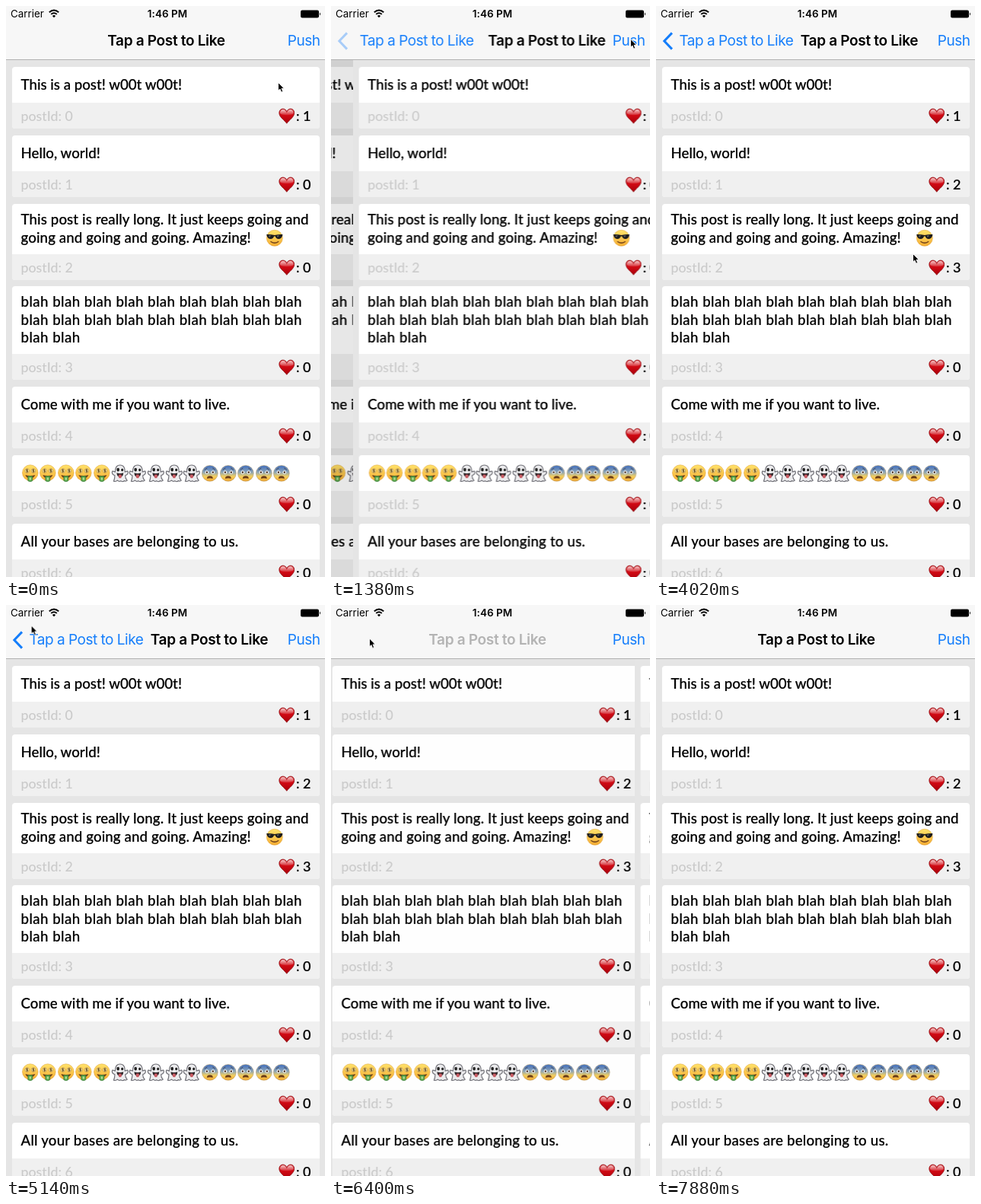
Recreate the animation shown at these times as an HTML page. Size 419x750 px, loop 8 s.

```html
<!DOCTYPE html>
<html lang="en">
<head>
<meta charset="utf-8">
<title>Tap a Post to Like</title>
<style>
:root {
  --spring: linear(0, .014 2%, .073 5%, .222 10%, .528 20%, .742 30%, .868 40%,
    .935 50%, .969 60%, .985 70%, .993 80%, .997 90%, 1);
  --blue: #157efb;
}
html, body { margin: 0; width: 100%; height: 100%; overflow: hidden; }
body { position: relative; background: #e5e5e5; color: #000; }
svg { display: block; overflow: visible; }

.page {
  position: absolute; inset: 0; overflow: hidden; background: #e5e5e5;
  font: 500 18.7px/23.4px Lato, "Open Sans", sans-serif;
}
.under { animation: under 8s var(--spring) infinite; }
.over { animation: over 8s var(--spring) infinite; }
.dim { position: absolute; inset: 0; background: #000; animation: dim 8s var(--spring) infinite; }

.card {
  position: absolute; left: 8px; width: 404px;
  border-radius: 4px; overflow: hidden; background: #fff;
}
.text {
  display: flex; flex-direction: column; justify-content: center;
  padding-left: 11.5px; white-space: pre; -webkit-text-stroke: .2px #000;
}
.emojis { display: flex; }
.emojis svg, .cool { width: 23.65px; height: 23.65px; }
.cool { position: absolute; left: 333px; top: 33px; }
.meta { position: relative; height: 34px; line-height: 34px; background: #f0f0f0; }
.id { position: absolute; left: 11.5px; font-size: 17.8px; color: #cacaca; }
.heart { position: absolute; left: 349.5px; top: 7px; width: 21.5px; height: 21px; }
.likes {
  position: absolute; right: 11.5px; font-size: 18px; white-space: pre;
  -webkit-text-stroke: .2px #000;
}
.likes::after { content: "0"; }
.n0::after { content: "1"; }
.n1::after { animation: likes1 8s step-end infinite; }
.n2::after { animation: likes2 8s step-end infinite; }

.nav {
  position: absolute; left: 0; top: 0; width: 100%; height: 70px; overflow: hidden;
  background: #f7f7f7; border-bottom: 1px solid #b2b2b2;
  font: 19px/24px Inter, Roboto, sans-serif; letter-spacing: -.5px; white-space: nowrap;
}
.nav > * { position: absolute; }
.title { top: 34px; width: 200px; text-align: center; font-weight: 600; letter-spacing: -.32px; }
.t1 { left: 110.5px; animation: t1 8s var(--spring) infinite, t1fade 8s linear infinite; }
.t2 { left: 167px; animation: t2 8s var(--spring) infinite, fade 8s linear infinite; }
.back { left: 30.5px; top: 34px; color: var(--blue);
  animation: back 8s var(--spring) infinite, fade 8s linear infinite; }
.chevron { left: 9px; top: 34px; animation: chevron 8s linear infinite; }
.push { right: 6.5px; top: 34px; color: var(--blue); }
.carrier, .clock { top: 2px; font-size: 13.4px; line-height: 17px; letter-spacing: 0; }
.carrier { left: 6px; }
.clock { left: 162px; width: 100px; text-align: center; font-weight: 600; letter-spacing: .1px; }
.wifi { left: 56px; top: 4px; }
.battery { left: 386px; top: 5px; }

.cursor {
  position: absolute; left: 0; top: 0;
  animation: move 8s ease-in-out infinite, hide 8s step-end infinite;
}

@keyframes under {
  0%, 13.975%, 83.015%, 100% { transform: none; }
  20.615%, 76.375% { transform: translateX(-126px); }
}
@keyframes over {
  0%, 13.975%, 83.015%, 100% { transform: translateX(419px); }
  20.615%, 76.375% { transform: translateX(0); }
}
@keyframes dim {
  0%, 13.975%, 83.015%, 100% { opacity: 0; }
  20.615%, 76.375% { opacity: .1; }
}
@keyframes t1 {
  0%, 13.975%, 83.015%, 100% { transform: none; }
  20.615%, 76.375% { transform: translateX(-104px); }
}
@keyframes t2 {
  0%, 13.975%, 83.015%, 100% { transform: translateX(240px); }
  20.615%, 76.375% { transform: translateX(0); }
}
@keyframes back {
  0%, 13.975%, 83.015%, 100% { transform: translateX(104px); }
  20.615%, 76.375% { transform: translateX(0); }
}
@keyframes t1fade {
  0%, 13.975%, 83.015%, 100% { opacity: 1; }
  16.475%, 78.875% { opacity: 0; }
}
@keyframes fade {
  0%, 13.975%, 78.4%, 100% { opacity: 0; }
  16.475%, 76.375% { opacity: 1; }
}
@keyframes chevron {
  0%, 15.975%, 78.4%, 100% { opacity: 0; }
  19.7%, 74.5% { opacity: 1; }
  76%, 76.5% { opacity: .33; }
}
@keyframes likes1 {
  0% { content: "0"; }
  32% { content: "1"; }
  35%, 100% { content: "2"; }
}
@keyframes likes2 {
  0% { content: "0"; }
  41.25% { content: "1"; }
  45% { content: "2"; }
  48.5%, 100% { content: "3"; }
}
@keyframes move {
  0%, .25% { transform: translate(357px, 100px); }
  4.5%, 20.3% { transform: translate(393px, 43px); }
  28.75%, 36.5% { transform: translate(353px, 218px); }
  40%, 55.75% { transform: translate(337px, 325px); }
  65.25%, 66.25% { transform: translate(26px, 20px); }
  68.5%, 70.25% { transform: translate(46px, 43px); }
  72.5%, 100% { transform: translate(50px, 43.5px); }
}
@keyframes hide {
  0% { opacity: 1; }
  96.25%, 100% { opacity: 0; }
}
</style>
</head>
<body>
<svg width="0" height="0" style="position:absolute">
  <defs>
    <linearGradient id="gold" x2="0" y2="1">
      <stop offset="0" stop-color="#ffe36b"/><stop offset="1" stop-color="#f5ad33"/>
    </linearGradient>
    <linearGradient id="cold" x2="0" y2="1">
      <stop offset=".1" stop-color="#4f79bd"/><stop offset=".45" stop-color="#93a9b5"/>
      <stop offset=".7" stop-color="#f5cf5c"/><stop offset="1" stop-color="#f2a630"/>
    </linearGradient>
    <linearGradient id="red" x2="0" y2="1">
      <stop offset="0" stop-color="#d8383c"/><stop offset=".45" stop-color="#d00a14"/>
      <stop offset="1" stop-color="#a8000a"/>
    </linearGradient>
    <linearGradient id="gloss" x2="0" y2="1">
      <stop offset="0" stop-color="#fff" stop-opacity=".7"/>
      <stop offset="1" stop-color="#fff" stop-opacity=".1"/>
    </linearGradient>
  </defs>
  <symbol id="heart" viewBox="0 0 22 21">
    <path d="M11 20.5C8 16 .8 12 .8 6.300C.8 2.800 3.200.8 5.800.8C8.300.8 10.200 2.300 11 4.500C11.800 2.300 13.700.8 16.200.8C18.800.8 21.200 2.800 21.200 6.300C21.200 12 14 16 11 20.500Z" fill="url(#red)" stroke="#8f1219" stroke-width=".8"/>
    <path d="M2 7C1.800 3.500 4 1.800 6 1.800C8.500 1.800 10 3.800 11 6.500C12 3.800 13.500 1.800 16 1.800C18 1.800 20.200 3.500 20 7C17 10 5 10 2 7Z" fill="url(#gloss)"/>
  </symbol>
  <symbol id="money" viewBox="0 0 24 24">
    <circle cx="12" cy="11.300" r="10.500" fill="url(#gold)" stroke="#dd9a30" stroke-width=".5"/>
    <g fill="#fbe9a0" stroke="#b07a28" stroke-width=".6">
      <circle cx="7.800" cy="8.600" r="2.900"/><circle cx="16.200" cy="8.600" r="2.900"/>
    </g>
    <path id="cash" d="M9 7.500Q7.800 6.600 6.800 7.400T7.800 8.600T8.800 9.800T6.600 9.800M7.800 6.200V11" fill="none" stroke="#5b4012" stroke-width=".8"/>
    <use href="#cash" x="8.400"/>
    <path d="M5.500 14.200Q12 16.200 18.500 14.200Q17 18.600 12 18.600T5.500 14.200Z" fill="#70401a"/>
    <path d="M9 15.800H15V22Q12 24.300 9 22Z" fill="#5aa84c" stroke="#2f7030" stroke-width=".6"/>
    <ellipse cx="12" cy="19.300" rx="1.400" ry="1.800" fill="#b4dc98"/>
  </symbol>
  <symbol id="ghost" viewBox="0 0 24 24">
    <path d="M12 1C7 1 5.500 5 5.500 10L2 9Q.5 11 2.500 13.500L5 15Q5 19 3.500 22.500Q6.500 23.500 8.500 21.500Q11 23.800 13 22Q16 24 17.500 22Q20 23 21.500 21.500Q18.800 19 19 15L21.500 13.500Q23.500 11 22 9L18.500 10C18.500 5 17 1 12 1Z" fill="#ececee" stroke="#6f6f76" stroke-width="1.200"/>
    <ellipse cx="9.300" cy="7.200" rx="1.900" ry="2.500" fill="#222"/>
    <ellipse cx="14.900" cy="7.400" rx="1.500" ry="1.900" fill="#222"/>
    <path d="M7.500 11.500Q12 13 16.500 11.500Q16 17 12 17T7.500 11.500Z" fill="#2a2326"/>
    <path d="M10 14Q12 13 14 14V17.500Q12 19.500 10 17.500Z" fill="#c95b63"/>
  </symbol>
  <symbol id="fear" viewBox="0 0 24 24">
    <circle cx="12" cy="12" r="10.600" fill="url(#cold)" stroke="#a98f5c" stroke-width=".5"/>
    <path d="M4.800 7.500Q6.500 6 8.500 5M19.200 7.500Q17.500 6 15.500 5" fill="none" stroke="#3c4150" stroke-width="1"/>
    <g fill="#fff"><circle cx="8" cy="10.600" r="2.300"/><circle cx="16" cy="10.600" r="2.300"/></g>
    <g fill="#3d2413"><circle cx="8" cy="10.700" r="1.200"/><circle cx="16" cy="10.700" r="1.200"/></g>
    <path d="M8 19Q8 15.500 12 15.500T16 19Q12 18 8 19Z" fill="#6a3b17"/>
  </symbol>
  <symbol id="cool" viewBox="0 0 24 24">
    <circle cx="12" cy="12" r="10.700" fill="url(#gold)" stroke="#dd9a30" stroke-width=".5"/>
    <path d="M1.200 7.200Q6 6.800 12 8Q18 6.800 22.800 7.200L22.200 9.500Q21 13.200 17.300 13.200Q13.800 13.200 12.900 9.700H11.100Q10.200 13.200 6.700 13.200Q3 13.200 1.800 9.500Z" fill="#1c1c1e"/>
    <path d="M4 8.700L7.500 8.500L5 11.200ZM15 8.600L18.500 8.500L16 11.200Z" fill="#666"/>
    <path d="M7 16.800Q12 20.300 17 16.800" fill="none" stroke="#6a3b17" stroke-width="1.300" stroke-linecap="round"/>
  </symbol>
</svg>

<div class="page under"></div>
<div class="page over"></div>

<div class="nav">
  <span class="carrier">Carrier</span>
  <svg class="wifi" width="14" height="12" viewBox="0 0 14 12" fill="none" stroke="#000" stroke-width="1.900">
    <path d="M.8 4.300Q7-1.500 13.200 4.300M3.200 6.900Q7 3.500 10.800 6.900"/>
    <path d="M4.900 8.900Q7 7 9.100 8.900L7 11.300Z" fill="#000" stroke="none"/>
  </svg>
  <span class="clock">1:46 PM</span>
  <svg class="battery" width="28" height="11" viewBox="0 0 28 11">
    <rect x="1" y=".5" width="24" height="10" rx="2"/>
    <path d="M26 3.500Q28 5.500 26 7.500Z"/>
  </svg>
  <svg class="chevron" width="13" height="24" viewBox="0 0 13 24">
    <path d="M12 1.400L1.900 12L12 22.600" fill="none" stroke="#157efb" stroke-width="3"/>
  </svg>
  <span class="back">Tap a Post to Like</span>
  <span class="title t1">Tap a Post to Like</span>
  <span class="title t2">Tap a Post to Like</span>
  <span class="push">Push</span>
</div>

<svg class="cursor" width="10" height="15" viewBox="0 0 10 15">
  <path d="M.5.500V11.200L2.900 9L4.600 13.200L6.700 12.300L5 8.300H8.300Z" fill="#000" stroke="#fff" stroke-width=".9"/>
</svg>

<script>
const icon = (name, cls = name) => `<svg class="${cls}"><use href="#${name}"/></svg>`;
const blah = n => Array(n).fill('blah').join(' ');
const emojis = ['money', 'ghost', 'fear'].map(e => icon(e).repeat(5)).join('');

const posts = [
  { top: 80, body: 'This is a post! w00t w00t!' },
  { top: 170, body: 'Hello, world!' },
  { top: 260, height: 65.5, track: .1, body: 'This post is really long. It just keeps going and\ngoing and going and going. Amazing!' + icon('cool') },
  { top: 368, height: 89, track: .43, body: [9, 9, 2].map(blah).join('\n') },
  { top: 500, body: 'Come with me if you want to live.' },
  { top: 590, body: `<div class="emojis">${emojis}</div>` },
  { top: 680, track: .2, body: 'All your bases are belonging to us.' }
];

const card = ({ top, height = 47, track = 0, body }, i) => `
  <div class="card" style="top:${top}px">
    <div class="text" style="height:${height}px;letter-spacing:${track}px"><div>${body}</div></div>
    <div class="meta">
      <span class="id">postId: ${i}</span>${icon('heart')}<span class="likes n${i}">: </span>
    </div>
  </div>`;

const cards = posts.map(card).join('');
document.querySelector('.under').innerHTML = cards + '<div class="dim"></div>';
document.querySelector('.over').innerHTML = cards;
</script>
</body>
</html>
```
